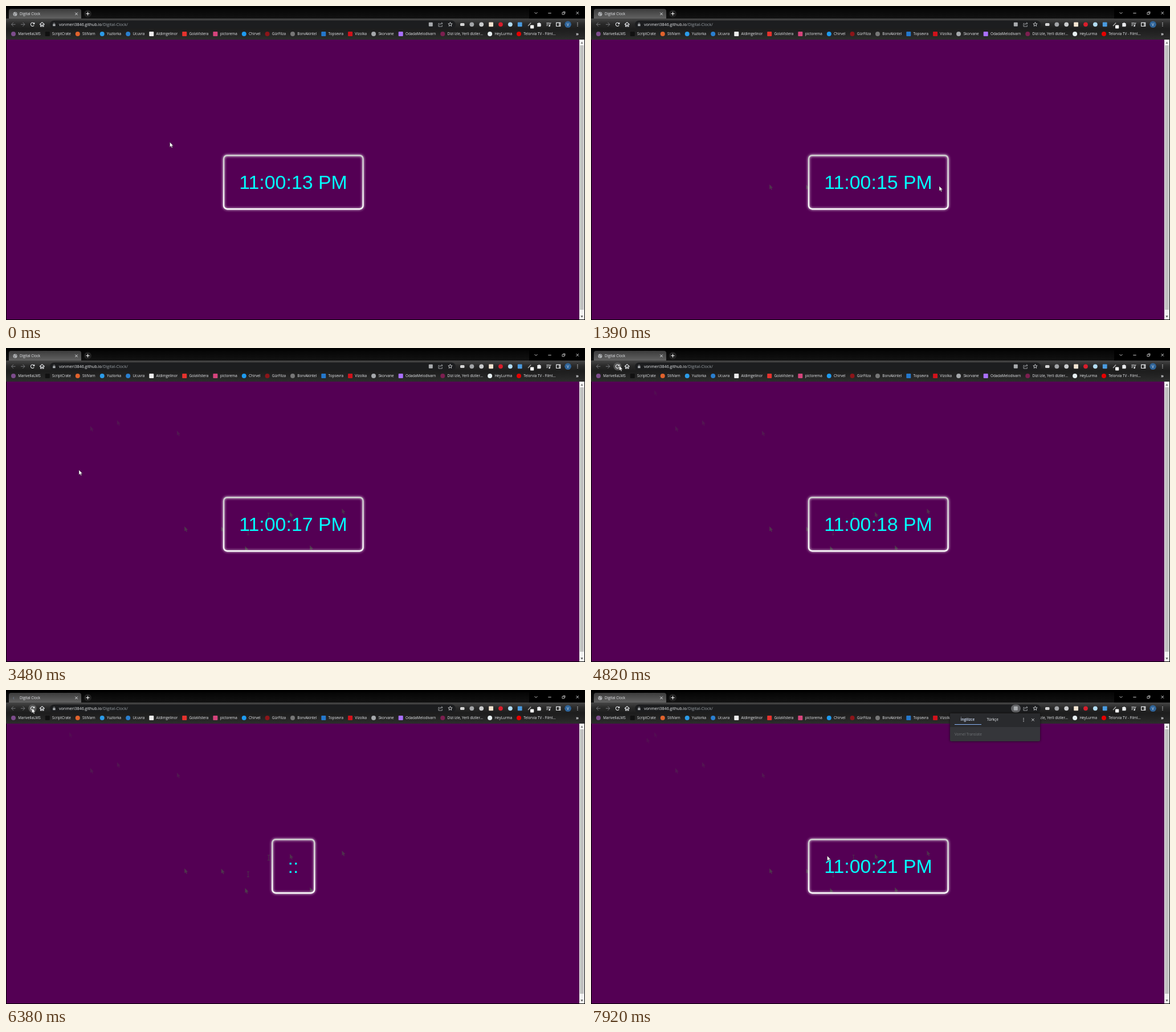
An HTML page with a canvas for the animation above (7990 ms loop, 1016x551 px).

```html
<!DOCTYPE html>
<html lang="en">
<head>
<meta charset="utf-8">
<title>Digital Clock</title>
<style>
html, body { margin: 0; width: 100%; height: 100%; overflow: hidden; background: #000; }
canvas { display: block; }
</style>
</head>
<body>
<canvas id="stage" width="1016" height="551"></canvas>
<script>
const ctx = document.getElementById('stage').getContext('2d');
const LOOP = 7990, STEP = 66.6;
const UI = '"Open Sans", "Noto Sans", sans-serif';
const CLOCK_FONT = '33.9px "Liberation Sans", Arial, sans-serif';
const LIGHT = '#e8eaed';

// Each stroke of the pointer runs through evenly timed points, then rests.
const strokes = [];
let last = { x: 287.5, y: 239 };
function stroke(start, end, ...points) {
  strokes.push({ start, end, points: [last, ...points] });
  last = points[points.length - 1];
}
const at = (x, y) => ({ x, y });
stroke(30, 400, at(264, 262), at(313, 313), at(411, 310));
stroke(530, 1320, at(474, 309), at(611, 316));
stroke(1580, 1920, at(640, 300), at(688, 291));
stroke(2070, 2864, at(564, 287), at(459, 295), at(420, 348), at(534, 346), at(634, 304));
stroke(2864, 3440, at(300, 145), at(148, 137), at(128, 214));
stroke(3530, 4430, at(180, 350), at(238, 168), at(111, 74), at(49.5, 31));
stroke(5070, 5200, at(45.5, 32));
stroke(7230, 7600, at(98, 84), at(363, 264), at(389, 271));
stroke(7870, 7920, at(414.5, 291));

function spline(a, b, c, d, u) {
  return b + u / 2 * (c - a + u * (2 * a - 5 * b + 4 * c - d + u * (3 * (b - c) + d - a)));
}
function pointerAt(t) {
  const { start, end, points } = strokes.filter(s => s.start <= t).pop() || strokes[0];
  const n = points.length - 1;
  const u = n * Math.min(1, Math.max(0, (t - start) / (end - start)));
  const i = Math.min(n - 1, Math.floor(u));
  const [a, b, c, d] = [i - 1, i, i + 1, i + 2].map(k => points[Math.min(n, Math.max(0, k))]);
  return at(spline(a.x, b.x, c.x, d.x, u - i), spline(a.y, b.y, c.y, d.y, u - i));
}

// Moments at which the pointer leaves a faint mark behind
const trailTimes = [277, 352, 2320, 2384, 2470, 2544, 2704, 2900, 3056, 3165, 3248, 4205, 7353];

function rect(x, y, w, h, fill) {
  ctx.fillStyle = fill;
  ctx.fillRect(x, y, w, h);
}
function round(x, y, w, h, r, fill) {
  ctx.beginPath();
  ctx.roundRect(x, y, w, h, r);
  ctx.fillStyle = fill;
  ctx.fill();
}
function disc(x, y, r, fill) {
  ctx.beginPath();
  ctx.arc(x, y, r, 0, 7);
  ctx.fillStyle = fill;
  ctx.fill();
}
const badge = (x, y, r, fill, square) =>
  square ? round(x - r, y - r, 2 * r, 2 * r, 1, fill) : disc(x, y, r, fill);
function arc(x, y, r, color, width, from, to) {
  ctx.beginPath();
  ctx.arc(x, y, r, from, to);
  ctx.strokeStyle = color;
  ctx.lineWidth = width;
  ctx.stroke();
}
// SVG path data, placed at x, y
function glyph(x, y, data, color, width) {
  ctx.save();
  ctx.translate(x, y);
  const shape = new Path2D(data);
  ctx.fillStyle = ctx.strokeStyle = color;
  ctx.lineWidth = width || 1;
  if (width) ctx.stroke(shape);
  else ctx.fill(shape);
  ctx.restore();
}
function text(s, x, y, color = LIGHT, font = '6.35px ' + UI) {
  ctx.font = font;
  ctx.fillStyle = color;
  ctx.fillText(s, x, y);
  return ctx.measureText(s).width;
}
function gradient(x0, y0, x1, y1, ...colors) {
  const g = ctx.createLinearGradient(x0, y0, x1, y1);
  colors.forEach((c, i) => g.addColorStop(i / (colors.length - 1), c));
  return g;
}
function dots(x, y) {
  for (const d of [-2.6, 0, 2.6]) disc(x, y + d, .75, LIGHT);
}
const cross = (x, y) => glyph(x, y, 'M-2.2-2.2L2.2 2.2M2.2-2.2L-2.2 2.2', LIGHT, .9);

const SQUARE = true;
const bookmarks = [
  ['MarivellaLMS', '#7d4c8c'], ['ScriptCrate', '#111', SQUARE], ['StilVarn', '#e0622c'],
  ['Yuzlorka', '#2b9be8'], ['Ucuvra', '#2a7fd0'], ['Aldimgelinor', '#ececec', SQUARE],
  ['GolaVistera', '#e5322d', SQUARE], ['pictorema', '#d5447c', SQUARE], ['Chirvel', '#1d9bf0'],
  ['GürFilza', '#8c1519'], ['BorvAkintel', '#777'], ['Topsevra', '#2478cc', SQUARE],
  ['Vizolka', '#d0121b', SQUARE], ['Skorvane', '#a5a8ab'], ['OdadaMelodivarn', '#a970ff', SQUARE],
  ['Dizi izle, Yerli diziler...', '#7c1f50'], ['HeyLurma', '#e6eef0'],
  ['Telorvia TV - Filml...', '#e60000']
];

// The row is justified so that the last icon always sits in the same place.
function drawBookmarks() {
  ctx.font = '6.35px ' + UI;
  const widths = bookmarks.map(b => ctx.measureText(b[0]).width);
  const used = widths.slice(0, -1).reduce((a, b) => a + b);
  const gap = (900 - 13 - used) / (bookmarks.length - 1);
  let x = 13;
  bookmarks.forEach(([label, color, square], i) => {
    badge(x, 49, 4, color, square);
    text(label, x + 8.3, 51.2);
    x += widths[i] + gap;
  });
  text('»', 1000, 51.5, LIGHT, 'bold 8px ' + UI);
}

const extensions = [
  ['#a3a5a8'], ['#c9cbcd'], ['#f3e5d2', SQUARE], ['#d81e2c'], ['#b3dcf2'], ['#4a9be0', SQUARE]
];

function drawExtensions() {
  const y = 32.3, slot = i => 800.5 + 16.87 * i;
  round(slot(0) - 3.5, y - 2.3, 7.5, 5, 1.5, '#d4d4d4');
  extensions.forEach(([color, square], i) => badge(slot(i + 1), y, 3.9, color, square));
  glyph(slot(7), y, 'M-2.5 2.7L2.5-2.8', '#aaa', 1.4);
  round(920, 33.5, 6.3, 6, 1, '#f4f4f4');
  glyph(slot(8), y, 'M-3.2-2.4H-1.2A1.3 1.3 0 0 1 1.2-2.4H3V0A1.3 1.3 0 0 1 3 2.3V4H-3.2Z', LIGHT);
  glyph(slot(9), y, 'M-4-2.5H1.5M-4-.3H.5M-4 2H-1.5M2.2 2.5V-2.3H4.3', LIGHT, .9);
  disc(slot(9) + 1.2, y + 2.6, 1.3, LIGHT);
  glyph(slot(10), y, 'M-3.5-3H3.5V3.2H-3.5ZM1.7-3V3.2', LIGHT, 1.2);
  disc(slot(11), y, 5.8, '#2f6499');
  text('V', slot(11) - 2, y + 2.4);
  dots(slot(12), y);
}

function drawTabs(t) {
  rect(0, 0, 1016, 59, '#000');
  rect(0, 4, 918, 18, gradient(0, 4, 0, 22, '#050505', '#121212'));
  round(5, 5, 127, 18, [4, 4, 0, 0], gradient(0, 5, 0, 23, '#3c3c3c', '#646464'));
  if (t > 5830 && t < 6450) {
    arc(16, 14, 3, '#6f7d95', .9, t / 160, t / 160 + 1.5);
  } else {
    disc(16, 14, 3.6, '#b4b6b9');
    glyph(16, 14, 'M-3-1L-.5 .2L-1 3M.5-3L1-1L3-.5', '#555', .7);
  }
  text('Digital Clock', 24, 16.2);
  cross(123.5, 13.8);
  disc(143.5, 13.5, 6.5, '#222');
  glyph(143.5, 13.5, 'M-3 0H3M0-3V3', '#fff', 1);
  glyph(930, 12.3, 'M-2.5-1.3L0 1.2L2.5-1.3', '#ddd', .9);
  glyph(954, 12.3, 'M-2.7 .2H2.7', '#ddd', .9);
  glyph(978, 12.3, 'M-2-1H1.6V2.6H-2ZM-.7-2.3H3V1.3', '#ddd', .8);
  cross(1002.8, 12.3);
}

function drawToolbar(t, hoverReload, popup) {
  const y = 32.3;
  rect(0, 22, 1016, 37, gradient(0, 22, 0, 59, '#464646', '#292929', '#1d1d1d', '#242424', '#2d2d2d'));
  round(77, 25.5, 712, 14, 7, '#1c1d1f');
  glyph(13, y, 'M3.5 0H-3.5M0-3.5L-3.5 0L0 3.5', '#77797c', 1);
  glyph(29.5, y, 'M-3.5 0H3.5M0-3.5L3.5 0L0 3.5', '#77797c', 1);
  if (hoverReload) disc(46.5, y, 7, '#555');
  arc(46.5, y, 3.1, LIGHT, 1.1, .5, 5.6);
  glyph(46.5, y, 'M3.8-3.9V-.3H.3Z', LIGHT);
  glyph(63.3, y, 'M-4.3 .2L0-3.6L4.3 .2M-2.7-.8V3.7H-1V1H1V3.7H2.7V-.8', LIGHT, 1.1);
  round(82.2, 31.4, 4.4, 3.8, .5, '#a9adb1');
  arc(84.4, 31, 1.3, '#a9adb1', .7, Math.PI, Math.PI * 2);
  const font = '7.1px ' + UI;
  const width = text('vonmeri3846.github.io', 93, 34.8, LIGHT, font);
  text('/Digital-Clock/', 93 + width, 34.8, '#9aa0a6', font);

  if (popup > 0) round(737, 25.5, 17, 14, 7, `rgba(120,122,125,${.75 * popup})`);
  if (t < 5900 || popup > 0) badge(745.3, y, 3.5, '#a7aaad', SQUARE);
  glyph(762.5, y, 'M-2-1.8H-3.5V3.7H2.8V1.2M-1.5 1.2L-.5-1.3L3.5-1.8M1.5-3.6L3.5-1.8L1.5 .2', '#b5b8bb', .8);
  const star = Array.from({ length: 10 }, (_, i) => {
    const a = (i / 5 - .5) * Math.PI, r = i % 2 ? 1.7 : 3.8;
    return `${r * Math.cos(a)} ${r * Math.sin(a)}`;
  });
  glyph(779.5, y, `M${star.join('L')}Z`, LIGHT, .8);
  drawExtensions();
  drawBookmarks();
}

function drawPage() {
  rect(0, 59, 1016, 492, '#000');
  rect(1, 59, 1005, 491, '#540054');
  rect(1006, 59, 9, 491, '#f1f1f1');
  rect(1007, 69, 7, 464, '#c1c1c1');
  glyph(1010.5, 64.5, 'M-2.2 1.4H2.2L0-1.4Z', '#777');
  glyph(1010.5, 545, 'M-2.2-1.4H2.2L0 1.4Z', '#505050');
}

function drawClock(t) {
  const empty = t > 6280 && t < 7310;
  const seconds = t < 6280 ? 13 + Math.floor((t + 965) / 1005) : 21;
  const label = empty ? '::' : `11:00:${seconds} PM`;
  const width = empty ? 74 : 244.5;
  ctx.save();
  ctx.shadowColor = '#fff';
  ctx.shadowBlur = 4;
  ctx.strokeStyle = gradient(0, 262, 0, 357, '#cfcfcf', '#e4e4e4', '#fff');
  ctx.lineWidth = 2.4;
  ctx.beginPath();
  ctx.roundRect(504.3 - width / 2, 262.2, width, 94, 6);
  ctx.stroke();
  ctx.restore();

  ctx.font = CLOCK_FONT;
  const left = 504 - ctx.measureText(label).width / 2;
  text(label, left, 321, '#0ff', CLOCK_FONT);
  if (t > 530 && t < 1040) drawSelection(label, left, pointerAt(t - 220).x);
}

// Selects whole characters up to the edge nearest to x.
function drawSelection(label, left, x) {
  const edges = [...label].map((c, i) =>
    ctx.measureText(label.slice(0, i + 1)).width - ctx.measureText(c).width);
  const miss = e => Math.abs(left + e - x);
  const width = edges.reduce((best, e) => miss(e) < miss(best) ? e : best);
  ctx.save();
  ctx.beginPath();
  ctx.rect(Math.round(left), 290, Math.round(width), 38.5);
  ctx.clip();
  rect(left - 2, 290, width + 4, 39, '#0f5fdc');
  text(label, left, 321, '#fff', CLOCK_FONT);
  ctx.restore();
}

const overText = ({ x, y }) => x > 408 && x < 600 && y > 292 && y < 332;
const ARROW = 'M0 0V8.6L2 6.8L3.3 9.8L4.7 9.2L3.4 6.3L6 6.2Z';
const BEAM = 'M-2-4.5H2M0-4.5V4.5M-2 4.5H2';

function drawPointer(p, color, outline) {
  if (overText(p)) return glyph(p.x, p.y, BEAM, color, .9);
  glyph(p.x, p.y, ARROW, color);
  if (outline) glyph(p.x, p.y, ARROW, outline, .5);
}

function drawTrails(t) {
  for (const time of trailTimes) {
    if (time + STEP > t) break;
    const p = pointerAt(time);
    ctx.globalAlpha = p.y / 480;
    drawPointer(p, '#4b5148');
  }
  ctx.globalAlpha = 1;
}

function drawPopup(alpha) {
  if (alpha <= 0) return;
  const bold = '600 6.35px ' + UI;
  ctx.save();
  ctx.globalAlpha = alpha;
  ctx.shadowColor = '#000a';
  ctx.shadowBlur = 4;
  round(630, 41, 158, 49, 2, '#35363a');
  ctx.shadowBlur = 0;
  round(630, 41, 158, 24, [2, 2, 0, 0], '#292a2d');
  text('İngilizce', 648.5, 54.4, '#d5e3fc', bold);
  text('Türkçe', 694.5, 54.4, '#c4c7cb', bold);
  rect(638, 60, 47, 1, '#8ab4f8');
  dots(759, 52.3);
  cross(775.5, 52.3);
  text('Vornel Translate', 638, 79.5, '#6f7276');
  ctx.restore();
}

function draw(t) {
  const pointer = pointerAt(t);
  const popup = Math.min(1, Math.max(0, (t - 6450) / 250));
  const pressed = (t > 530 && t < 1380) || (t > 5750 && t < 5900);
  drawPage();
  drawTrails(t);
  drawClock(t);
  drawTabs(t);
  drawToolbar(t, t > 4400 && t < 7230, popup);
  drawPopup(popup);
  if (pressed) disc(pointer.x, pointer.y, 6.5, 'rgba(170,175,20,.8)');
  drawPointer(pointer, pressed && overText(pointer) ? '#d8a92c' : '#fff', '#333');
}

const start = performance.now();
function tick() {
  const t = (performance.now() - start) % LOOP;
  draw(Math.floor((t + 16) / STEP) * STEP);
  requestAnimationFrame(tick);
}
tick();
</script>
</body>
</html>
```
